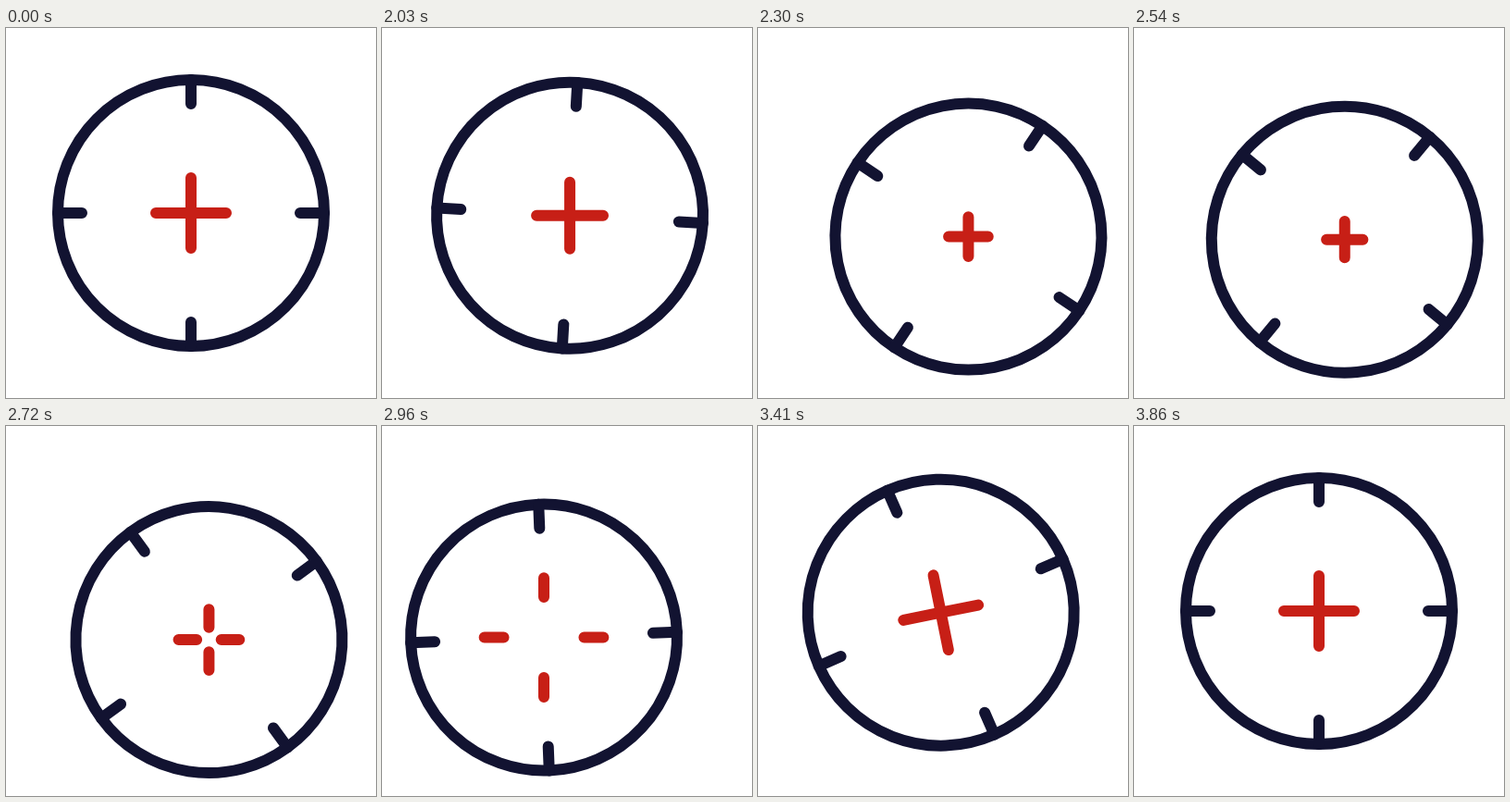
Animation of 400x400 px, one loop 3950 ms. Source, as an HTML page:

```html
<!DOCTYPE html>
<html lang="en">
<head>
<meta charset="utf-8">
<title>Crosshair</title>
<style>
  html, body { margin: 0; width: 100%; height: 100%; overflow: hidden; background: #fff; }
  svg { display: block; width: 100%; height: 100%; }
  g { fill: none; stroke-width: 12; stroke-linecap: round; }
  #ring { stroke: #121331; }
  #cross { stroke: #c71f16; }
</style>
</head>
<body>
<svg viewBox="0 0 400 400">
  <g id="ring">
    <circle r="144"/>
    <path d="M0-144V-118M0 144V118M-144 0H-118M144 0H118"/>
  </g>
  <g id="cross"><path/></g>
</svg>
<script>
const LOOP = 3950, START = 2000, END = 3860, STEP = 30;

const sineOut = p => Math.sin(p * Math.PI / 2);
const cubic = p => p < 0.5 ? 4 * p ** 3 : 1 - 4 * (1 - p) ** 3;
const mix = (a, b, u) => a + (b - a) * u;
const bez = (a, b, c, d, u) => {
  const v = 1 - u;
  return a * v ** 3 + 3 * b * v * v * u + 3 * c * v * u * u + d * u ** 3;
};

// CSS-style timing curve, solved by bisection
const curve = (x1, y1, x2, y2) => p => {
  let lo = 0, hi = 1;
  for (let i = 0; i < 24; i++) {
    const m = (lo + hi) / 2;
    if (bez(0, x1, x2, 1, m) < p) lo = m; else hi = m;
  }
  return bez(0, y1, y2, 1, (lo + hi) / 2);
};

// Each row: start time, end time, easing, from, to
const spin = [
  [2000, 2440, curve(0.3, 0.35, 0.6, 1), 0, 39],
  [2440, 3110, cubic, 39, 90],
  [3110, 3860, curve(0.28, 0, 0.1, 1), 90, 180]
];
const twist = [[3100, 3620, curve(0.4, 0, 0.2, 1), 0, 90]];
const gap = [
  [2440, 3110, cubic, 0, 45.5],
  [3110, 3380, cubic, 45.5, 0]
];
const arm = [
  [2000, 2440, sineOut, 38, 19],
  [2440, 3110, cubic, 19, 21],
  [3110, 3390, cubic, 21, 41.2],
  [3390, 3700, cubic, 41.2, 38]
];

// Each row: start time, end time, easing, four curve points
const route = [
  [2000, 2490, sineOut, [200, 200], [209.6, 208.6], [231.2, 225], [227.8, 228.7]],
  [2500, 3105, cubic, [227.8, 228.7], [217, 234], [184, 233], [173, 227.7]],
  [3095, 3515, cubic, [173, 227.7], [182, 223], [187.3, 208.8], [200, 200]]
];

function locate(track, t) {
  let row = track[0];
  for (const r of track) if (t >= r[0]) row = r;
  const p = Math.min(1, Math.max(0, (t - row[0]) / (row[1] - row[0])));
  return [row[2](p), ...row.slice(3)];
}

function value(track, t) {
  const [u, a, b] = locate(track, t);
  return mix(a, b, u);
}

function place(t) {
  const [u, a, b, c, d] = locate(route, t);
  return [0, 1].map(i => bez(a[i], b[i], c[i], d[i], u));
}

const ring = document.getElementById('ring');
const cross = document.getElementById('cross');
const arms = cross.firstElementChild;

function draw(t) {
  const [x, y] = place(t);
  const inner = value(gap, t), outer = inner + value(arm, t);
  const pose = angle => `translate(${x} ${y}) rotate(${angle})`;
  ring.setAttribute('transform', pose(value(spin, t)));
  cross.setAttribute('transform', pose(value(twist, t)));
  arms.setAttribute('d', [1, -1].map(s =>
    `M${s * inner} 0H${s * outer}M0 ${s * inner}V${s * outer}`).join(''));
}

const origin = performance.now();
function tick() {
  const t = (performance.now() - origin) % LOOP;
  const steps = Math.floor((t - START) / STEP);
  draw(Math.min(END, Math.max(START, START + steps * STEP)));
  requestAnimationFrame(tick);
}
tick();
</script>
</body>
</html>
```
